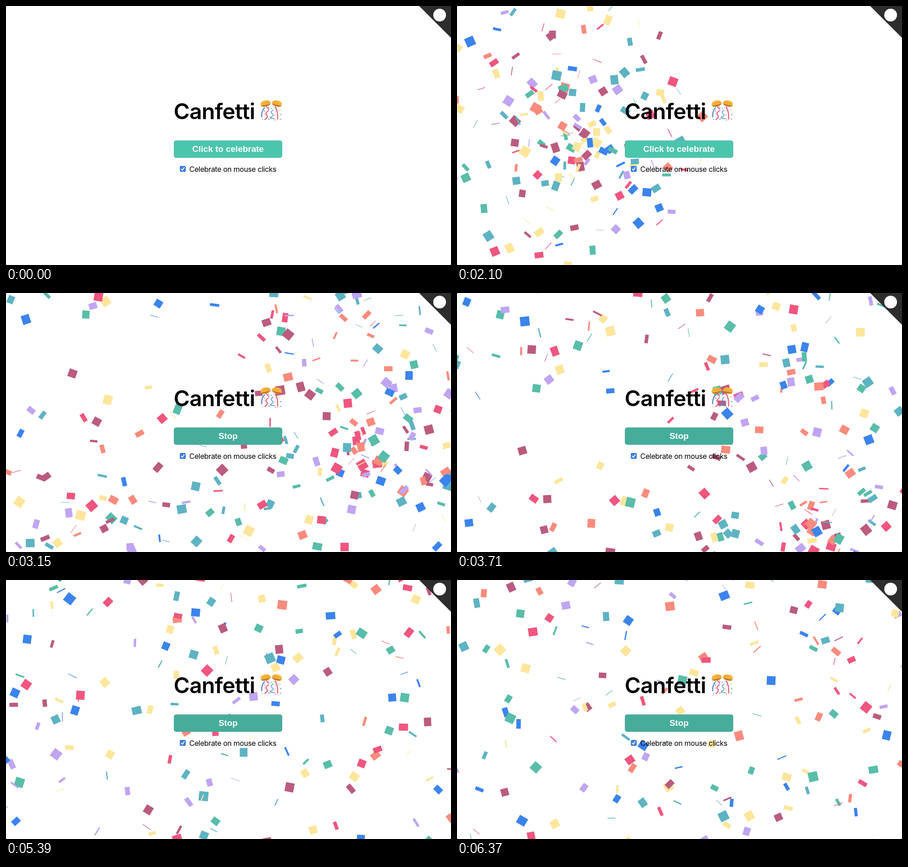
An HTML page with a canvas for the animation above (6440 ms loop, 978x570 px).

```html
<!DOCTYPE html>
<html lang="en">
<head>
<meta charset="utf-8">
<title>Canfetti</title>
<style>
  html, body { margin: 0; width: 100%; height: 100%; overflow: hidden; background: #fff; }
  canvas, svg { position: absolute; left: 0; top: 0; }
  .title { font: 600 48px Inter, sans-serif; letter-spacing: -0.7px; }
  .label { font: 16px Inter, sans-serif; letter-spacing: -0.35px; }
  .button { font: 700 19px "Liberation Sans", Arial, sans-serif; fill: #fff; text-anchor: middle; }
</style>
</head>
<body>
<canvas id="confetti" width="978" height="570"></canvas>
<svg width="978" height="570" viewBox="0 0 978 570">
  <defs>
    <linearGradient id="gold" x1="0" y1="0" x2="1" y2="1">
      <stop offset="0" stop-color="#ffc64a"/>
      <stop offset="1" stop-color="#e58a1d"/>
    </linearGradient>
    <g id="bowl">
      <path d="M560 219Q558 210 569 208Q579 206 582 214Q580 219 571 221Q563 223 560 219Z" fill="url(#gold)"/>
      <path d="M560 219Q568 217 582 214Q579 220 571 221Q563 223 560 219Z" fill="#c47a20"/>
      <path d="M560 219Q568 217 582 214" fill="none" stroke="#ffd469" stroke-width="1.2"/>
    </g>
  </defs>

  <path d="M908 0H978V70Z" fill="#2d2d2d"/>
  <circle cx="953" cy="20" r="14" fill="#fff"/>

  <text class="title" x="368.500" y="249">Canfetti</text>

  <g fill="none" stroke-width="2.100" stroke-linecap="round">
    <path d="M568 224Q561 232 562 244" stroke="#3f7fd0"/>
    <path d="M572 222Q581 228 575 232T573 240T569 250" stroke="#e8507a"/>
    <path d="M576 221Q580 225 577 230" stroke="#d9c3e8"/>
    <path d="M587 229Q580 233 585 237T583 244T590 248" stroke="#4b8bd6" stroke-width="1.600"/>
    <path d="M592 222Q598 232 597 249" stroke="#e25570"/>
    <path d="M588 222Q594 226 593 233" stroke="#e9c6d8"/>
  </g>
  <g fill="#f2b84b">
    <circle cx="569" cy="238" r="1.300"/><circle cx="564" cy="250" r="1.300"/>
    <circle cx="602" cy="229" r="1.300"/><circle cx="591" cy="240" r="1.300"/>
  </g>
  <g fill="#5cb98c">
    <circle cx="604" cy="239" r="1.400"/><circle cx="578" cy="249" r="1.400"/><circle cx="583" cy="225" r="1.200"/>
  </g>
  <g fill="#d96aa5">
    <circle cx="603" cy="249" r="1.300"/><circle cx="568" cy="231" r="1.200"/><circle cx="592" cy="251" r="1.200"/>
  </g>
  <use href="#bowl"/>
  <use href="#bowl" transform="matrix(-1 0 0 1 1166 0)"/>

  <rect id="button" x="369" y="296" width="238" height="38" rx="5" stroke="#6f9a92" stroke-opacity="0.300"/>
  <text class="button" id="caption" x="488" y="321"></text>

  <rect x="382" y="352" width="13" height="13" rx="2" fill="#3b7fdc"/>
  <path d="M385 358.500L387.700 361.500L392 355" fill="none" stroke="#fff" stroke-width="1.900"/>
  <text class="label" x="402.800" y="365">Celebrate on mouse clicks</text>

  <!-- rounded window corners -->
  <path d="M0 0H2L0 2ZM0 570H2L0 568ZM978 570H976L978 568Z" fill="#888"/>
</svg>
<script>
  const LOOP = 6440, STEP = 70, HOVER = 2520, RAIN = 2800;
  const DRAG = 1.9, WIDTH = 978, HEIGHT = 570, TURN = Math.PI * 2;
  const COLORS = ['#f0567f', '#3b84ee', '#58bda9', '#fa8b7d', '#fde69c', '#c0a5f2', '#bb5b80', '#5eb3c3'];
  const ctx = document.getElementById('confetti').getContext('2d');
  const button = document.getElementById('button');
  const caption = document.getElementById('caption');

  let seed = 20417;
  const random = () => (seed = (seed * 16807) % 2147483647) / 2147483647;
  const between = (a, b) => a + (b - a) * random();

  const pieces = [];
  function addPiece(start, x, y, vx, vy, angle, flip) {
    pieces.push({
      start, x, y, vx, vy, angle, flip,
      fall: between(320, 400),
      spin: between(-2.5, 2.5),
      flipSpeed: between(-9, 9),
      size: between(16, 21),
      color: COLORS[Math.floor(random() * COLORS.length)]
    });
  }

  function addBurst(start, x, y) {
    for (let i = 0; i < 175; i++) {
      const direction = between(0, TURN);
      const speed = 830 * random() ** 0.8;
      addPiece(start, x, y, speed * Math.cos(direction), speed * Math.sin(direction),
        between(-1.05, -0.45), between(0.9, 2.2));
    }
  }

  addBurst(1470, 238, 185);
  addBurst(2350, 780, 188);
  for (let start = RAIN; start < LOOP; start += between(4, 20)) {
    addPiece(start, between(-20, WIDTH + 20), -16, between(-60, 60), between(130, 200),
      between(0, TURN), between(0, TURN));
  }

  // Air drag slows the launch while each piece settles into its falling speed.
  function drawPiece(p, time) {
    const age = (time - p.start) / 1000;
    if (age <= 0) return;
    const glide = (1 - Math.exp(-DRAG * age)) / DRAG;
    const x = p.x + p.vx * glide;
    const y = p.y + p.vy * glide + p.fall * (age - glide);
    if (y > HEIGHT + 20) return;
    const tilt = Math.abs(Math.cos(p.flip + p.flipSpeed * age));
    const thickness = p.size * Math.max(0.06, tilt ** 1.3);
    ctx.save();
    ctx.translate(x, y);
    ctx.rotate(p.angle + p.spin * age);
    ctx.fillStyle = p.color;
    ctx.fillRect(-p.size / 2, -thickness / 2, p.size, thickness);
    ctx.restore();
  }

  function draw() {
    const time = Math.floor((performance.now() % LOOP) / STEP) * STEP;
    ctx.clearRect(0, 0, WIDTH, HEIGHT);
    for (const piece of pieces) drawPiece(piece, time);
    button.setAttribute('fill', time < HOVER ? '#4cc5ad' : '#46ad9b');
    caption.textContent = time < RAIN ? 'Click to celebrate' : 'Stop';
    requestAnimationFrame(draw);
  }
  draw();
</script>
</body>
</html>
```
